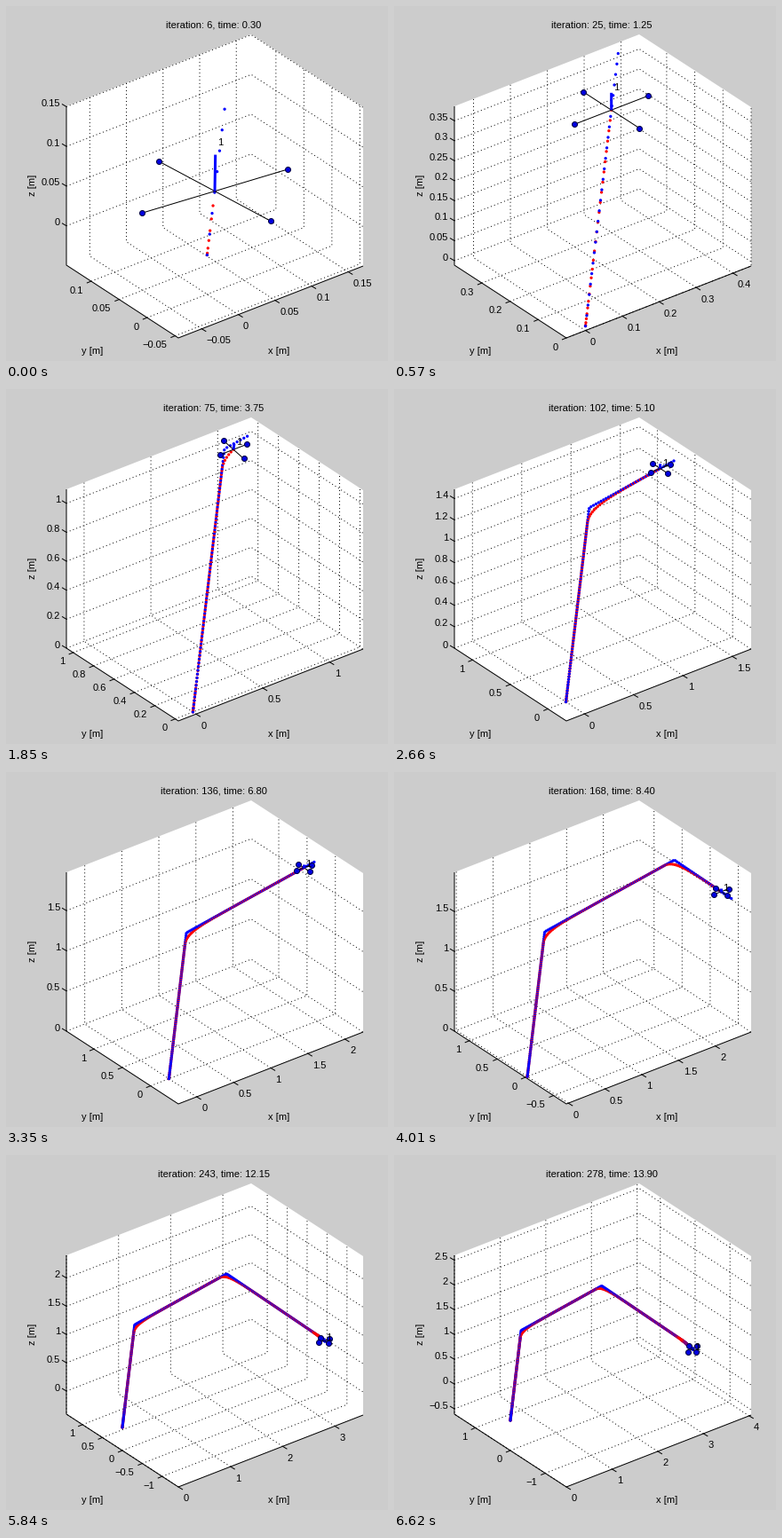
A matplotlib script for the animation above (7950 ms loop, 430x400 px).

```python
import numpy as np
import matplotlib.pyplot as plt
from matplotlib.animation import FuncAnimation
from matplotlib.collections import LineCollection

W, H, DPI = 430, 400, 100
PX = 72 / DPI                      # one pixel in points
plt.rcParams["font.family"] = "Liberation Sans"
plt.rcParams["font.size"] = 8

# Projected box: front corner and the three edge vectors, in pixels
FRONT = np.array([194.0, 374.0])
EDGES = np.array([[208.0, -81.0], [-126.0, -82.0], [0.0, -179.0]])
ASPECT = np.array([1.261, 1.0, 1.0])
MAX_TICKS = (6, 6, 8.5)

# Flight model: constant speed reference, first order tracking
DT, SUB, SPEED, LAG = 0.05, 20, 0.5, 0.272
ARM, MAST, TAG, TILT = 0.1, 0.043, 0.058, 0.28
WAYPOINTS = np.array([[0, 0, 0], [1, 1, 1], [2, 0, 2], [3, -1, 1], [4, 0, 0]], float)
LEG_TIME = np.sqrt(3) / SPEED
LAST = 278

# Playback: animation frame -> simulation iteration
KEY_FRAMES = [0, 52, 55, 58, 61, 88, 133, 194, 220]
KEY_ITERS = [6, 58, 64, 70, 75, 102, 168, 243, LAST]
SLOW_START, SLOW_END, SLOW_STEP = 52, 61, 3


def iteration(frame):
    if SLOW_START <= frame < SLOW_END:
        frame -= (frame - SLOW_START) % SLOW_STEP
    return int(round(np.interp(frame, KEY_FRAMES, KEY_ITERS)))


def reference(t):
    knots = np.arange(len(WAYPOINTS)) * LEG_TIME
    return np.stack([np.interp(t, knots, c) for c in WAYPOINTS.T], axis=-1)


def simulate():
    h = DT / SUB
    ref = reference(np.arange((LAST + 1) * SUB + 1) * h)
    pos = np.zeros_like(ref)
    decay = np.exp(-h / LAG)
    for k in range(len(ref) - 1):
        middle = (ref[k] + ref[k + 1]) / 2
        pos[k + 1] = middle + (pos[k] - middle) * decay
    ref_vel = np.gradient(ref, h, axis=0)
    acc = (ref_vel - (ref - pos) / LAG) / LAG
    return ref[::SUB], pos[::SUB], acc[::SUB]


DESIRED, ACTUAL, ACCEL = simulate()


def quad_points(k):
    """Four rotors (x+, y+, x-, y-), centre and mast top."""
    tx, ty = TILT * ACCEL[k, :2]
    bx, by, up = np.array([[1, 0, -tx], [0, 1, -ty], [tx, ty, 1]])
    offsets = np.array([ARM * bx, ARM * by, -ARM * bx, -ARM * by, 0 * up, MAST * up])
    return ACTUAL[k] + offsets


def equal_limits(points):
    lo, hi = points.min(axis=0), points.max(axis=0)
    size = ASPECT * ((hi - lo) / ASPECT).max()
    return (lo + hi - size) / 2, size


def to_screen(unit):
    return FRONT + np.asarray(unit) @ EDGES


def ticks(lo, size, most):
    steps = [m * 10.0 ** e for e in range(-3, 2) for m in (1, 2, 5)]
    step = next(s for s in steps if size / s <= most)
    first = np.ceil(lo / step - 1e-6)
    last = np.floor((lo + size) / step + 1e-6)
    return np.arange(first, last + 1) * step


def tick_label(value):
    return f"{round(value, 6) + 0.0:g}".replace("-", "\u2212")


def add_lines(paths, style="solid"):
    ax.add_collection(LineCollection(paths, colors="black", linewidths=PX,
                                     linestyles=[style]))


def draw_box(lo, size):
    hexagon = to_screen([[0, 0, 0], [1, 0, 0], [1, 0, 1], [1, 1, 1], [0, 1, 1], [0, 1, 0]])
    ax.fill(*hexagon.T, color="white", lw=0)
    grid, marks = [], []
    # per axis: grid polyline across two walls, mark vector, label offset, alignment
    styles = [
        (lambda s: [[s, 0, 0], [s, 1, 0], [s, 1, 1]], (5, 3), (5.5, 16.5), "left"),
        (lambda s: [[0, s, 0], [1, s, 0], [1, s, 1]], (-5, 2), (-9, 13.5), "right"),
        (lambda s: [[0, 1, s], [1, 1, s], [1, 0, s]], (-5, -3), (-7, -0.5), "right"),
    ]
    for axis, (line, mark, shift, align) in enumerate(styles):
        for value in ticks(lo[axis], size[axis], MAX_TICKS[axis]):
            path = to_screen(line((value - lo[axis]) / size[axis]))
            grid.append(path)
            marks.append([path[0], path[0] + mark])
            ax.text(*(path[0] + shift), tick_label(value), ha=align, va="baseline")
    marks.append(to_screen([[0, 1, 1], [0, 1, 0], [0, 0, 0], [1, 0, 0]]))
    add_lines(grid, (0, (1, 3)))
    add_lines(marks)


def draw_captions(n):
    ax.text(234, 24, f"iteration: {n}, time: {n * DT:.2f}", ha="center")
    ax.text(307, 392, "x [m]", ha="center")
    ax.text(97, 392, "y [m]", ha="center")
    ax.text(30, 202, "z [m]", ha="center", va="center", rotation=90)


def draw_trails(project, k):
    # order both trails along the path so that their dots interleave
    dots = np.concatenate([DESIRED[:k + 1], ACTUAL[:k + 1]])
    steps = np.arange(k + 1)
    order = np.argsort(np.concatenate([steps, steps - LAG / DT]), kind="stable")
    colors = np.repeat(["#0000ff", "#ff0000"], k + 1)
    ax.scatter(*project(dots[order]).T, s=(3.3 * PX) ** 2, c=colors[order],
               linewidths=0, zorder=3)


def draw_quad(project, k, body):
    rotors = project(body[:4])
    for a, b in ((0, 2), (1, 3)):
        ax.plot(*rotors[[a, b]].T, color="black", lw=PX, zorder=4)
    ax.plot(*project(body[4:]).T, color="#0000ff", lw=3 * PX,
            solid_capstyle="butt", zorder=4)
    ax.plot(*rotors.T, "o", ms=6 * PX, mfc="#0000e0", mec="#000040", mew=PX, zorder=5)
    tag = project(body[4] + (body[5] - body[4]) * TAG / MAST)
    ax.text(tag[0] + 2, tag[1] + 4, "1", zorder=6)


def draw(frame):
    ax.clear()
    ax.axis("off")
    n = iteration(frame)
    k = n + 1
    body = quad_points(k)
    lo, size = equal_limits(np.concatenate([DESIRED[:k + 1], ACTUAL[:k + 1], body]))

    def project(points):
        return to_screen((points - lo) / size)

    draw_box(lo, size)
    draw_captions(n)
    draw_trails(project, k)
    draw_quad(project, k, body)
    ax.set_xlim(0, W)
    ax.set_ylim(H, 0)
    return []


fig = plt.figure(figsize=(W / DPI, H / DPI), dpi=DPI, facecolor="#cccccc")
ax = fig.add_axes([0, 0, 1, 1])
anim = FuncAnimation(fig, draw, frames=265, interval=30, init_func=lambda: [],
                     repeat=True, repeat_delay=0)
plt.show()
```
